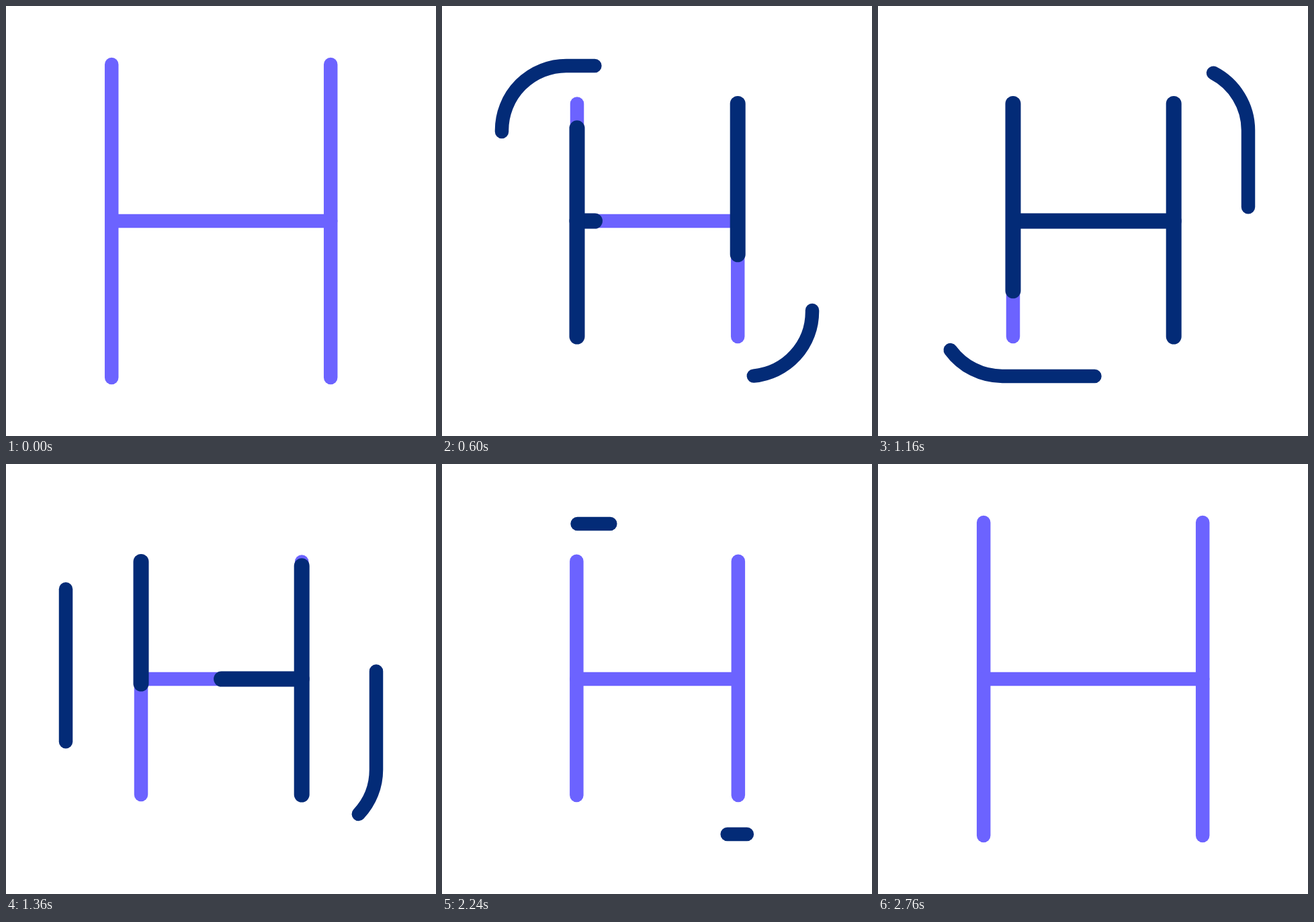
An HTML page with a canvas for the animation above (3 s loop, 640 by 640 pixels).

```html
<!DOCTYPE html>
<html lang="en">
<head>
<meta charset="utf-8">
<title>H loop</title>
<style>
  html, body { margin: 0; width: 100%; height: 100%; overflow: hidden; background: #fff; }
  canvas { display: block; width: 100vmin; height: 100vmin; }
</style>
</head>
<body>
<canvas id="stage" width="640" height="640"></canvas>
<script>
const LOOP = 3000, STEP = 40;
const LIGHT = '#6c63ff', DARK = '#032b77';
const ctx = document.getElementById('stage').getContext('2d');
ctx.lineCap = 'round';

const mix = (a, b, p) => a + (b - a) * p;

// Progress on cubic-bezier(x1, 0, x2, 1) between two times.
function ease(t, from, to, x1 = 0.33, x2 = 0.67) {
  const x = (t - from) / (to - from);
  if (x <= 0) return 0;
  if (x >= 1) return 1;
  let low = 0, high = 1;
  for (let i = 0; i < 24; i++) {
    const u = (low + high) / 2, v = 1 - u;
    if (3 * u * v * v * x1 + 3 * u * u * v * x2 + u * u * u < x) low = u;
    else high = u;
  }
  return low * low * (3 - 2 * low);
}

function line(x1, y1, x2, y2, color, width) {
  ctx.strokeStyle = color;
  ctx.lineWidth = width;
  ctx.beginPath();
  ctx.moveTo(x1, y1);
  ctx.lineTo(x2, y2);
  ctx.stroke();
}

// The part of a bar between its erased and its drawn share.
function trimmed(x1, y1, x2, y2, start, end) {
  if (end <= start) return;
  line(mix(x1, x2, start), mix(y1, y2, start), mix(x1, x2, end), mix(y1, y2, end), DARK, 23);
}

// Rounded square, clockwise from the lower right corner.
const ring = new Path2D(
  'M551 453V455A96 96 0 0 1 455 551H185A96 96 0 0 1 89 455V185' +
  'A96 96 0 0 1 185 89H455A96 96 0 0 1 551 185V453');

function runner(turn, length, travel, grow, move, shrink) {
  const tail = travel * move + length * shrink;
  const size = length * (grow - shrink);
  if (size <= 0) return;
  ctx.save();
  ctx.translate(320, 320);
  ctx.rotate(turn);
  ctx.translate(-320, -320);
  ctx.strokeStyle = DARK;
  ctx.lineWidth = 20.5;
  ctx.setLineDash([size, 4000]);
  ctx.lineDashOffset = -tail;
  ctx.stroke(ring);
  ctx.restore();
}

function draw(t) {
  ctx.clearRect(0, 0, 640, 640);

  const small = ease(t, 160, 520) - ease(t, 2200, 2760);
  const left = mix(157.2, 201, small), right = mix(483.2, 440.2, small);
  const top = mix(87, 145.5, small), bottom = mix(553, 492, small);

  line(left, top, left, bottom, LIGHT, 20.5);
  line(right, top, right, bottom, LIGHT, 20.5);
  line(left, 320, right, 320, LIGHT, 20.5);

  trimmed(left, 320, right, 320, ease(t, 1120, 1600), ease(t, 495, 1005));
  trimmed(left, bottom, left, top, ease(t, 960, 1900, 0.16, 0.69), ease(t, 280, 680));
  trimmed(right, top, right, bottom, ease(t, 1300, 2060), ease(t, 360, 760));

  runner(0, 227, 832, ease(t, 370, 760), ease(t, 880, 1800, 0.34, 0.34), ease(t, 1840, 2410));
  runner(Math.PI, 219, 805, ease(t, 290, 680), ease(t, 800, 1760, 0.37, 0.2), ease(t, 1800, 2370));
}

function tick() {
  draw(Math.floor(performance.now() % LOOP / STEP) * STEP);
  requestAnimationFrame(tick);
}
tick();
</script>
</body>
</html>
```
